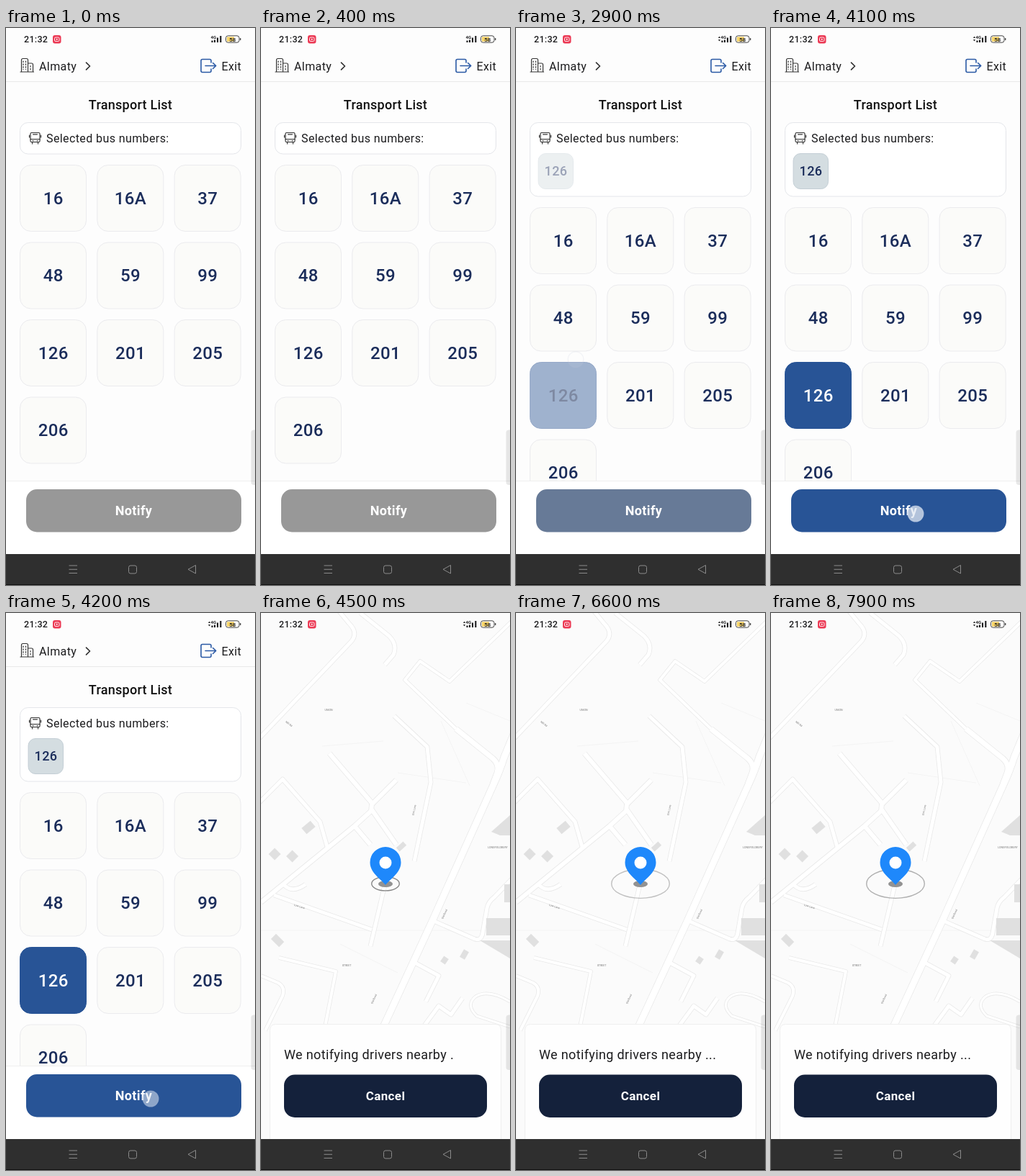
An HTML page that plays this animation: 346x774 px, repeating every 8 s.

```html
<!DOCTYPE html>
<html lang="en">
<head>
<meta charset="utf-8">
<title>Transport list</title>
<style>
html, body { margin: 0; width: 100%; height: 100%; overflow: hidden; background: #fdfdfd; }
svg { display: block; width: 100vw; height: 100vh; }
text { font-family: Roboto, sans-serif; letter-spacing: .4px; fill: #1c1c1e; }
.mid { text-anchor: middle; }
.num { font-size: 24px; font-weight: 500; fill: #1b2d5b; text-anchor: middle; }
.tiny { font-size: 3.6px; letter-spacing: 0; fill: #777; text-anchor: middle; }
.line { fill: none; stroke: #333; stroke-width: 1.2; stroke-linecap: round; stroke-linejoin: round; }
</style>
</head>
<body>
<svg viewBox="0 0 346 774" preserveAspectRatio="none">
  <defs>
    <clipPath id="body"><rect y="75" width="346" height="554"/></clipPath>
  </defs>

  <g id="list">
    <rect width="346" height="774" fill="#fdfdfd"/>
    <path d="M0 74.5H346" stroke="#e9e9e9"/>
    <g class="line">
      <path d="M21.5 61V44.5Q21.5 42.5 23.5 42.5H28.5Q30.5 42.5 30.5 44.5V61M30.5 49H35.5Q37.5 49 37.5 51V61M20 61H38.5"/>
      <path d="M24 46V57.5M27.5 46V57.5M34 52.5V58" stroke-dasharray="1.5 2.3"/>
      <path d="M111.5 48.2L116.5 53L111.5 57.8" stroke-width="1.7"/>
    </g>
    <text x="46" y="58.5" font-size="16">Almaty</text>
    <path d="M285 48V45.5Q285 43.5 283 43.5H273Q271 43.5 271 45.5V59.5Q271 61.5 273 61.5H283Q285 61.5 285 59.5V57M277 52.5H291.5M287.5 48.5L291.7 52.5L287.5 56.5" class="line" style="stroke:#2a59a5;stroke-width:1.6"/>
    <text x="299.5" y="58.5" font-size="16">Exit</text>
    <text x="173" y="112.5" font-size="18" font-weight="500" class="mid" style="letter-spacing:.25px;fill:#111">Transport List</text>

    <rect id="panel" x="19.5" y="131.5" width="307" height="43.5" rx="11" fill="#fff" stroke="#e4e6ea"/>
    <g class="line">
      <rect x="34" y="145.5" width="13" height="13" rx="1.5"/>
      <path d="M34 154.5H47M37.5 147.8H43.5M36.5 159V161M44.5 159V161M32.5 149V152M48.5 149V152M37 156.6H38M43 156.6H44"/>
    </g>
    <text x="56" y="159" font-size="16">Selected bus numbers:</text>
    <g id="chip">
      <rect x="31" y="174.5" width="48.5" height="49" rx="10" fill="#d4dde1" stroke="#c3ced5"/>
      <text x="55.5" y="205.3" class="num" style="font-size:18px">126</text>
    </g>

    <g clip-path="url(#body)"><g id="tiles"></g></g>
    <rect y="629" width="346" height="102" fill="#fff"/>
    <path d="M0 629.5H346" stroke="#efefef"/>
    <rect id="notify" x="28" y="641" width="299" height="59.5" rx="15"/>
    <text x="177.5" y="677.3" font-size="18" font-weight="600" class="mid" style="fill:#fff">Notify</text>
    <circle id="touch" r="10.8"/>
  </g>

  <g id="map">
    <rect width="346" height="774" fill="#fbfbfb"/>
    <path d="M0 441H346M250 150L290 240M190 222L285 236M85 185L170 178M110 460L190 500M285 125L346 150" stroke="#f4f4f4" fill="none"/>
    <g id="casing" fill="none" stroke="#e9e9e9" stroke-linejoin="round"></g>
    <g id="core" fill="none" stroke="#fff" stroke-linejoin="round"></g>
    <g id="blocks" fill="#e0e0e0">
      <path d="M320 304L346 281V309H332ZM338 377H346V402H338ZM313 424H346V448H313ZM304 455H346V480Z"/>
    </g>
    <g id="names"></g>
    <ellipse cx="173" cy="376.5" rx="10" ry="4.6" fill="#929292"/>
    <ellipse id="ring" cx="173" cy="376.2" fill="none" stroke="#858585" stroke-width="1.4"/>
    <path d="M173 378C166 369 151.5 361 151.5 346.5A21.5 21.5 0 0 1 194.5 346.5C194.5 361 180 369 173 378Z" fill="#1e88fb"/>
    <circle cx="173" cy="347" r="8.5" fill="#fff"/>
    <path d="M12.5 740V579.5Q12.5 571.5 20.5 571.5H325.5Q333.5 571.5 333.5 579.5V740Z" fill="#fefefe" stroke="#efefef"/>
    <text id="msg" x="32" y="620.3" font-size="18" style="letter-spacing:.36px"></text>
    <rect x="32" y="641.5" width="282" height="59.5" rx="15" fill="#14213b"/>
    <text x="173" y="677.3" font-size="17" font-weight="700" class="mid" style="fill:#fff">Cancel</text>
  </g>

  <rect x="340.5" y="558.5" width="10" height="76.5" rx="4" fill="#000" opacity=".09"/>
  <text x="25" y="20" font-size="12.5" font-weight="500" style="letter-spacing:.3px">21:32</text>
  <rect x="65" y="10" width="11.5" height="11.5" rx="3" fill="#ec3a55"/>
  <rect x="67.5" y="13" width="6.5" height="5.5" rx="1.5" fill="none" stroke="#fff" stroke-width=".9"/>
  <circle cx="70.7" cy="15.7" r="1" fill="#fff"/>
  <path id="arrows" d="M281 14L282.5 11.5L284 14ZM281 16L282.5 18.5L284 16Z" fill="#222"/>
  <text x="284.5" y="15.3" font-size="6" font-weight="700" style="letter-spacing:0">4G</text>
  <path d="M286.5 17.5V20M290 16.5V20M294 13.5V20M298.3 11V20" stroke="#1c1c1e" stroke-width="2.1"/>
  <rect x="305.5" y="10.8" width="18.5" height="9.4" rx="3" fill="#fff" stroke="#444"/>
  <path d="M307 12.3H317V18.7H307Z" fill="#f6d266"/>
  <path d="M325.7 14V17" stroke="#444" stroke-width="1.3"/>
  <text x="314.8" y="18.5" font-size="8" font-weight="500" class="mid" style="letter-spacing:0">58</text>

  <rect y="731" width="346" height="43" fill="#2f2f2f"/>
  <path d="M0 773.5H346" stroke="#111"/>
  <path d="M87.5 747H99M87.5 752.3H99M87.5 757.5H99M263.5 746.5V758L253 752.3Z" fill="none" stroke="#8b8b8b"/>
  <rect x="170.5" y="747" width="11" height="11" rx="2.5" fill="none" stroke="#8b8b8b"/>
</svg>
<script>
const $ = id => document.getElementById(id);
const NS = 'http://www.w3.org/2000/svg';
const LOOP = 8000, PICK = 2840, OPEN = 4270, PULSE = 1340;

function add(parent, tag, attrs, text) {
  const el = document.createElementNS(NS, tag);
  set(el, attrs);
  if (text) el.textContent = text;
  parent.appendChild(el);
  return el;
}
function set(el, attrs) {
  for (const k in attrs) el.setAttribute(k, attrs[k]);
}
const ramp = (t, a, b) => Math.min(1, Math.max(0, (t - a) / (b - a)));
const ease = p => p * p * (3 - 2 * p);
const mix = (a, b, p) => `rgb(${a.map((v, i) => Math.round(v + (b[i] - v) * p))})`;
const BLUE = [40, 84, 150];

let picked;
['16', '16A', '37', '48', '59', '99', '126', '201', '205', '206'].forEach((name, i) => {
  const x = 19.5 + 107.3 * (i % 3), y = 190.5 + 107.5 * Math.floor(i / 3);
  const box = add($('tiles'), 'rect', { x, y, width: 92, height: 92, rx: 15, fill: '#fbfbf9', stroke: '#ebebee' });
  const label = add($('tiles'), 'text', { x: x + 46.2, y: y + 54, class: 'num' }, name);
  if (name === '126') picked = { box, label };
});

// roads: [width, path], drawn as a grey casing under a white core
const roads = [
  [9, 'M164 588L238 428L325 234Q332 219 338 200L352 166'],
  [7, 'M271 161L322 202Q332 211 328 222L322 238'],
  [5, 'M-5 177L125 40Q136 28 122 14L108 -3M138 0L178 32Q190 44 184 58L172 72'],
  [4, 'M271 161L200 93L221 67L262 95L350 10'],
  [5, 'M185 143L231 186L236 235L213 345'],
  [6, 'M95 195L155 265M188 232L154 266L153 275L130 296L0 402M153 272L188 322M130 296L152 322'],
  [5, 'M-3 264L30 231L82 290L92 325M18 392L154 440M172 378L152 463M32 378Q44 390 62 377'],
  [5, 'M240 428L297 453Q306 456 308 445L314 410Q316 401 324 395L350 368'],
  [5, 'M212 485L247 504L229 540M222 580L247 546L264 558L280 535'],
  [4, 'M25 479L104 498L88 580M0 504L24 514Q34 520 30 532L6 580'],
  [3, 'M346 575L300 560Q284 545 298 533Q316 522 346 540']
];
for (const [w, d] of roads) {
  add($('casing'), 'path', { d, 'stroke-width': w + 1.6 });
  add($('core'), 'path', { d, 'stroke-width': w });
}

// blocks: centre, size, angle
[[66, 298, 16, 11, -40], [19, 335, 12, 12, 45], [43.5, 338, 12, 12, 45], [23, 455, 10, 16, -45],
 [255, 482.5, 9, 8, -55], [282.5, 474.5, 12, 8, -60], [195, 324.5, 13, 7, -42]].forEach(([x, y, w, h, a]) =>
  add($('blocks'), 'rect', { x: -w / 2, y: -h / 2, width: w, height: h, transform: `translate(${x} ${y}) rotate(${a})` }));

[[94, 135.5, 0, 'UNION'], [329, 327, 0, 'LONGFIELDBURY'], [119, 490.5, 0, 'STREET'], [38, 155, 38, 'Mill Rd'],
 [53, 409, 18, 'Low Lane'], [214, 274, -78, 'Elm Lane'], [256, 419, -66, 'Old Road'], [158, 537, -66, 'Old Road']]
  .forEach(([x, y, a, s]) => add($('names'), 'text', { class: 'tiny', transform: `translate(${x} ${y}) rotate(${a})` }, s));

function dots(t) {
  if (t < 4700) return '.';
  return ['...', '.', '..'][Math.floor((t - 4700) / 500) % 3];
}

function draw(t) {
  const on = t >= PICK, tint = ramp(t, PICK, 2980);
  set($('panel'), { height: on ? 102.5 : 43.5 });
  set($('chip'), { opacity: tint });
  set($('tiles'), { transform: `translate(0 ${on ? 59 : 0})` });
  set(picked.box, { fill: mix([251, 251, 249], BLUE, tint), stroke: mix([235, 235, 238], BLUE, tint) });
  picked.label.style.fill = mix([27, 45, 91], [255, 255, 255], tint);
  set($('notify'), { fill: mix([152, 152, 152], BLUE, tint) });
  set($('arrows'), { opacity: on ? 1 : 0 });

  const second = t > 3500;
  const seen = second ? ramp(t, 4010, 4070) * (1 - ramp(t, 4180, 4260))
                      : ramp(t, 2610, 2680) * (1 - ramp(t, 2820, 2920));
  set($('touch'), {
    cx: second ? 201 : 83, cy: second ? 675 : 460.5, opacity: seen,
    fill: second ? 'rgba(225,232,242,.75)' : 'rgba(255,255,255,.35)',
    stroke: second ? 'rgba(190,205,228,.8)' : '#c9cddd', 'stroke-width': 1.4
  });

  set($('map'), { opacity: ramp(t, OPEN, 4450) });
  $('msg').textContent = 'We notifying drivers nearby ' + dots(t);

  // the pulse grows for a second, then fades before the next one
  const q = (t - 4160 + 4 * PULSE) % PULSE;
  const rx = 11.5 + 28.8 * ease(ramp(q, 0, 1000));
  set($('ring'), {
    rx, ry: rx / 2,
    opacity: q < 150 ? 0 : (1 - .25 * ramp(q, 300, 1000)) * (1 - ramp(q, 1030, 1240))
  });
}

const start = performance.now();
function tick(now) {
  draw(Math.max(0, now - start) % LOOP);
  requestAnimationFrame(tick);
}
draw(0);
requestAnimationFrame(tick);
</script>
</body>
</html>
```
